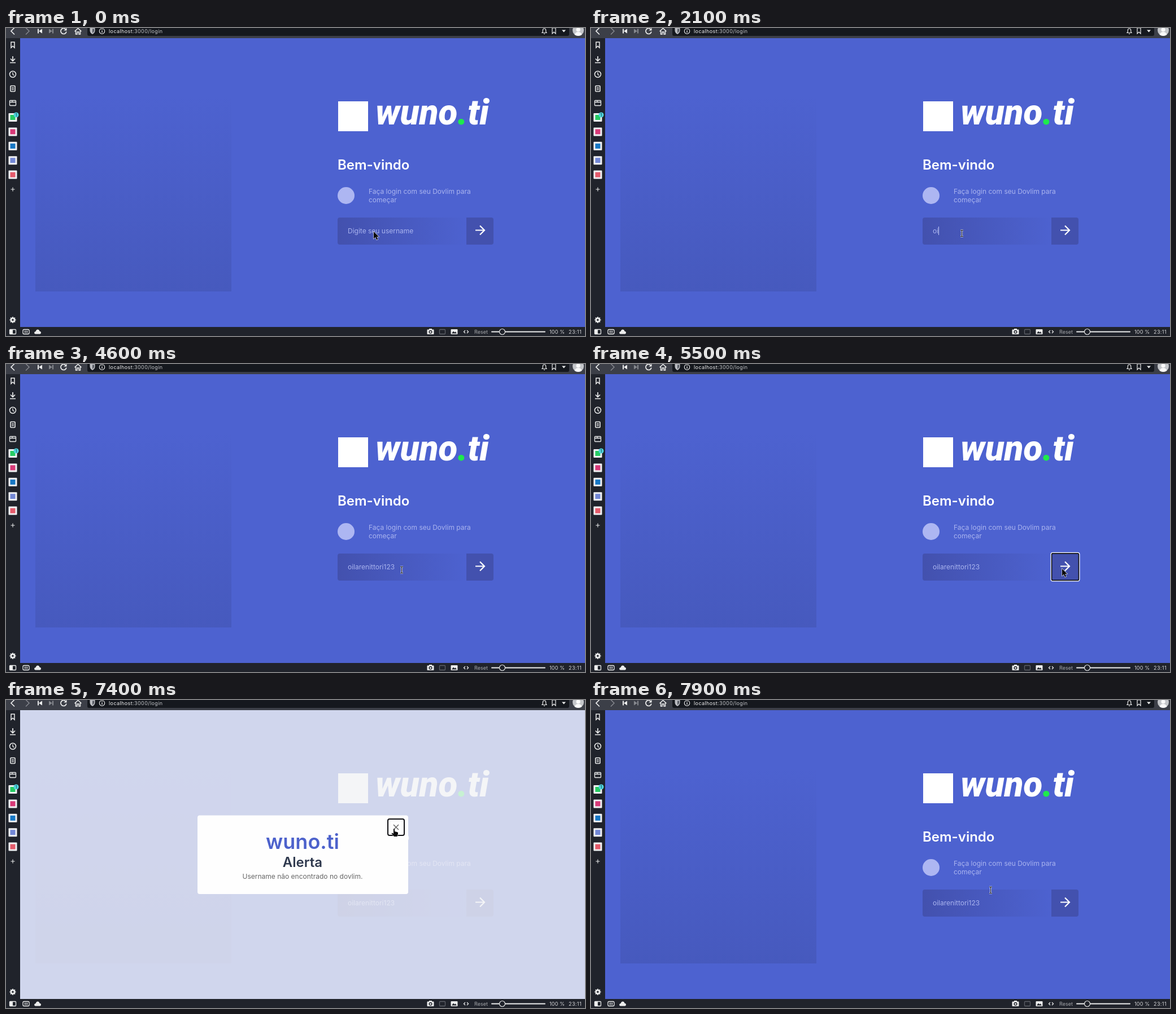
Animation, 1025 px wide and 546 px high, one loop 8000 ms. Source, as an HTML page with a canvas:

```html
<!DOCTYPE html>
<html lang="pt">
<head>
<meta charset="utf-8">
<title>Login</title>
<style>
html, body { margin: 0; width: 100%; height: 100%; overflow: hidden; background: #4d62d0; }
canvas { display: block; }
</style>
</head>
<body>
<canvas id="stage" width="1025" height="546"></canvas>
<script>
const ctx = document.getElementById('stage').getContext('2d');
const LOOP = 8000, STEP = 100;
const BLUE = '#4d62d0', DARK = '#4351ae', PALE = '#aab4ef', BAR = '#20232b', ICON = '#eceded', DIM = '#85888e';
const BRAND = 'wuno.ti', SITE = 'Dovlim', USER = 'oilarenittori123';

// time, x, y of the pointer tip (or the middle of the I-beam)
const PATH = [
  [0, 651, 361], [100, 643, 354], [200, 652, 361], [400, 652, 361], [500, 660, 364], [600, 660, 364],
  [1000, 657, 364], [4500, 657, 364], [4900, 831, 366], [5100, 831, 366], [5200, 826, 362],
  [5400, 826, 362], [5500, 834, 363], [6000, 834, 363], [6200, 628, 300], [6300, 628, 300],
  [6800, 684, 229], [6900, 684, 229], [7000, 687, 228], [7600, 687, 228], [7700, 692, 250], [7900, 708, 337]
];
const SHAPES = [[0, arrow], [700, beam], [4900, arrow], [7000, hand], [7700, arrow], [7900, beam]];
const TYPED = [[0, 0], [2000, 1], [2100, 2], [2200, 3], [2300, 4], [2500, 5], [2900, 6], [3000, 7], [3100, 8],
  [3300, 9], [3400, 10], [3500, 11], [3600, 13], [4000, 14], [4100, 16]];

const within = (t, a, b) => t >= a && t < b;
const at = (list, t) => list.filter(k => k[0] <= t).pop()[1];

function pointer(t) {
  const i = PATH.findIndex(k => k[0] > t);
  if (i < 0) return PATH[PATH.length - 1].slice(1);
  const [t0, x0, y0] = PATH[i - 1], [t1, x1, y1] = PATH[i];
  const k = (t - t0) / (t1 - t0);
  return [Math.round(x0 + (x1 - x0) * k), Math.round(y0 + (y1 - y0) * k)];
}

function rect(x, y, w, h, fill, r = 0) {
  ctx.beginPath();
  ctx.roundRect(x, y, w, h, r);
  ctx.fillStyle = fill;
  ctx.fill();
}

function frame(x, y, w, h, color, r = 0, width = 1.3) {
  ctx.beginPath();
  ctx.roundRect(x, y, w, h, r);
  ctx.lineWidth = width;
  ctx.strokeStyle = color;
  ctx.stroke();
}

function disc(x, y, r, fill) {
  ctx.beginPath();
  ctx.arc(x, y, r, 0, 7);
  ctx.fillStyle = fill;
  ctx.fill();
}

function arc(x, y, r, a, b, color, width = 1.5) {
  ctx.beginPath();
  ctx.arc(x, y, r, a, b);
  ctx.lineWidth = width;
  ctx.strokeStyle = color;
  ctx.stroke();
}

function shape(d, x, y, { fill, stroke, width = 1.5 }) {
  const p = new Path2D(d);
  ctx.save();
  ctx.translate(x, y);
  if (stroke) {
    ctx.lineWidth = width;
    ctx.strokeStyle = stroke;
    ctx.stroke(p);
  }
  if (fill) {
    ctx.fillStyle = fill;
    ctx.fill(p);
  }
  ctx.restore();
}
const line = (d, x, y, stroke = ICON, width = 1.5) => shape(d, x, y, { stroke, width });
const solid = (d, x, y, fill = ICON) => shape(d, x, y, { fill });

function text(s, x, y, size, color, { weight = 400, align = 'left', family = 'Inter', style = '', gap = 0 } = {}) {
  ctx.font = `${style} ${weight} ${size}px ${family}, sans-serif`;
  ctx.letterSpacing = gap + 'px';
  ctx.textAlign = align;
  ctx.fillStyle = color;
  ctx.fillText(s, x, y);
  return ctx.measureText(s).width;
}

function gradient(x0, y0, x1, y1, ...colors) {
  const g = ctx.createLinearGradient(x0, y0, x1, y1);
  colors.forEach((c, i) => g.addColorStop(i / (colors.length - 1), c));
  return g;
}

function arrow(x, y) {
  shape('M0 0V12.5L3 9.8L5 14.5L7.2 13.6L5.2 9H9Z', x, y, { fill: '#0b0b0d', stroke: '#e8e8ee', width: 1.2 });
}

function beam(x, y) {
  const d = 'M-2.5 -5.5H2.5M0 -5.5V5.5M-2.5 5.5H2.5';
  line(d, x - 0.5, y, '#d9dcf0', 2.6);
  line(d, x - 0.5, y, '#15161c', 1);
}

function hand(x, y) {
  const d = 'M-1 1Q0 -1 1 1V5L6 6.3Q7.5 7 7 9L5.5 14H0L-4.5 8.5Q-4 6.8 -1 9Z';
  shape(d, x, y, { fill: '#0b0b0d', stroke: '#f4f4f4', width: 1 });
}

function topBar() {
  rect(0, 0, 1025, 18, '#3c3f48');
  rect(144, -6, 853, 20, '#15181e', 3);
  line('M3 -6L-3 0L3 6', 12, 5.5, ICON, 1.7);
  line('M-3 -6L3 0L-3 6', 38, 5.5, DIM, 1.5);
  solid('M-4 -4H-2V4H-4ZM4 -4V4L-2 0Z', 60, 5.5);
  solid('M4 -4H2V4H4ZM-4 -4V4L2 0Z', 80, 5.5, DIM);
  arc(102, 5.5, 5, 0.2, 5.4, ICON, 1.7);
  solid('M6 -6V-1H1Z', 101.5, 5.5);
  line('M-6 0L0 -5.5L6 0M-4 -1V5H-1.5V1H1.5V5H4V-1', 127.5, 6);
  solid('M-4.5 -5H4.5V0Q4 4 0 6Q-4 4 -4.5 0Z', 153, 5, '#b9bbc0');
  solid('M0 -3.5H3V0Q2.5 2.5 0 4Z', 153, 5, '#555962');
  arc(170, 5.5, 4.7, 0, 7, ICON, 1.1);
  rect(169.4, 4.8, 1.3, 3.4, ICON);
  rect(169.4, 2.5, 1.3, 1.3, ICON);
  const w = text('localhost', 182, 9, 9, '#f0f0f1', { gap: 0.4 });
  text(':3000/login', 182 + w, 9, 9, '#c3c5c9', { gap: 0.4 });
  line('M-4 3H4L2.7 1V-2Q2.4 -4.5 0 -4.5Q-2.4 -4.5 -2.7 -2V1ZM-1 5H1', 953, 5.5, ICON, 1.2);
  line('M-3 -5H3V5L0 2L-3 5Z', 970, 5, ICON, 1.2);
  solid('M-3.5 -2H3.5L0 2Z', 987.5, 5.5);
  disc(1013, 4, 10, '#c4c6ca');
  disc(1013, 3, 3.6, '#fafafa');
  solid('M-6.5 4Q-5 -1 0 -1Q5 -1 6.5 4Q0 8 -6.5 4Z', 1013, 8, '#fafafa');
}

function appTile(color, i) {
  const y = 151 + i * 25.4;
  rect(4.5, y, 15, 15, '#f1f2f4', 1);
  rect(7.5, y + 3, 9, 9, color);
}

function sideBar() {
  rect(0, 18, 25, 528, BAR);
  line('M-3 -5H3V5L0 2L-3 5Z', 12, 30);
  line('M0 -6V2M-4 -1.5L0 2.5L4 -1.5M-5 5.5H5', 12, 56, ICON, 1.7);
  arc(12, 82, 5.5, 0, 7, ICON);
  line('M0 -3.5V0.3L2.5 2', 12, 82, ICON, 1.3);
  frame(8, 102.5, 8, 10, ICON, 1, 1.6);
  line('M-2 -2H2M-2 0H2M-2 2H2', 12, 107.5, ICON, 1);
  frame(6.5, 128.5, 11, 9, ICON, 1);
  line('M-5.5 -1.5H5.5M-1 -4V-1.5', 12, 133, ICON, 1.3);
  ['#27cc63', '#d83a78', '#1677c4', '#7388d6', '#e55b6b'].forEach(appTile);
  disc(18, 154, 4.6, '#4fd3dc');
  text('1', 18, 156.5, 7, '#14323a', { align: 'center' });
  line('M-3.5 0H3.5M0 -3.5V3.5', 12, 286, ICON, 1.1);
  for (let i = 0; i < 8; i++) {
    const a = i * Math.PI / 4;
    line(`M0 0L${5.5 * Math.cos(a)} ${5.5 * Math.sin(a)}`, 12, 517.5, ICON, 2.2);
  }
  disc(12, 517.5, 4, ICON);
  disc(12, 517.5, 1.7, BAR);
}

function bottomBar() {
  rect(0, 530, 1025, 16, BAR);
  frame(6.5, 534.5, 11, 8, ICON, 1);
  rect(7, 535, 5, 7, ICON);
  frame(30, 534.5, 11, 8, ICON, 2);
  line('M-1.7 -2V2M1.7 -2V2', 35.5, 538.5);
  solid('M-4 4Q-6 3.5 -6 1.5Q-5.5 -.5 -3.5 -.5Q-2.5 -4 0 -4Q3 -4 3.3 -1Q6 -.7 6 1.7Q5.7 4 4 4Z', 56, 538.5);
  rect(745.5, 534.5, 12, 8.5, ICON, 1);
  rect(749, 533, 5, 2, ICON);
  disc(751.5, 538.8, 3, BAR);
  disc(751.5, 538.8, 1.6, ICON);
  frame(767.5, 534.5, 10, 8, '#5d6067', 1);
  rect(787.5, 534, 12, 9, ICON, 1);
  solid('M-4.5 3L-1.5 -1L.5 1.2L2 -.3L4.5 3Z', 793.5, 538.5, BAR);
  line('M-1.5 -2.5L-4 0L-1.5 2.5M1.5 -2.5L4 0L1.5 2.5', 814.5, 538.5, ICON, 1.3);
  text('Reset', 829, 542, 9, '#a6a8ac');
  rect(859, 537.5, 96, 2, ICON, 1);
  disc(878.5, 538.5, 5.5, ICON);
  disc(878.5, 538.5, 4.4, BAR);
  text('100 %', 962, 542, 9, '#d5d6d8', { gap: 0.2 });
  text('23:11', 996, 542, 9, '#d5d6d8', { gap: 0.4 });
}

function wordmark() {
  rect(588, 130, 53, 53, '#fff');
  const opt = { weight: 900, family: 'Roboto', style: 'italic' };
  const [head, tail] = BRAND.split('.');
  let x = 654;
  x += text(head, x, 171, 62, '#fff', opt);
  x += text('.', x, 171, 62, '#1eea4c', opt);
  text(tail, x, 171, 62, '#fff', opt);
}

function page(t) {
  rect(25, 18, 1000, 512, BLUE);
  rect(52, 120, 347, 347, gradient(0, 120, 0, 467, 'rgba(67,85,180,0)', 'rgba(67,85,180,.65)'));
  wordmark();
  text('Bem-vindo', 587, 251, 24, '#fff', { weight: 600 });
  disc(602, 297, 15, '#adb6f2');
  text(`Faça login com seu ${SITE} para`, 642, 293.5, 12, PALE);
  text('começar', 642, 308.5, 12, PALE);

  rect(587, 336, 228, 48, gradient(587, 0, 815, 0, DARK, BLUE), [4, 0, 0, 4]);
  const count = at(TYPED, t);
  const w = text(count ? USER.slice(0, count) : 'Digite seu username', 605, 364, 12, PALE);
  if (within(t, 900, 1400) || within(t, 2000, 4600)) rect(605 + (count ? Math.round(w) : 0), 352, 1, 15, '#c3caf5');

  rect(815, 336, 48, 48, DARK, [0, 4, 4, 0]);
  if (within(t, 5200, 7400)) {
    frame(814.2, 334.5, 50.6, 50.3, '#fff', 3, 1.4);
    frame(815.6, 335.9, 47.8, 47.5, '#101014', 2, 1.6);
  }
  line('M-8 0H8M0 -8L8 0L0 8', 839, 358.5, '#fff', 2.2);
}

function modal(t) {
  rect(25, 18, 1000, 512, 'rgba(242,243,245,.8)');
  rect(339, 204.5, 373, 139.5, '#fefefe', 4);
  text(BRAND, 525, 264, 36, '#4d62cc', { weight: 600, align: 'center' });
  text('Alerta', 525, 296, 24, '#2e384d', { weight: 600, align: 'center' });
  text(`Username não encontrado no ${SITE.toLowerCase()}.`, 525, 317, 12, '#666', { align: 'center' });
  line('M-4.5 -4.5L4.5 4.5M4.5 -4.5L-4.5 4.5', 690.5, 225.5, '#666', 1.5);
  if (t >= 7400) frame(676, 211, 29, 29, '#101014', 3, 2);
}

function draw(now) {
  const t = Math.floor(now % LOOP / STEP) * STEP;
  page(t);
  if (within(t, 5900, 7700)) modal(t);
  topBar();
  sideBar();
  bottomBar();
  at(SHAPES, t)(...pointer(t));
  requestAnimationFrame(draw);
}
requestAnimationFrame(draw);
</script>
</body>
</html>
```
